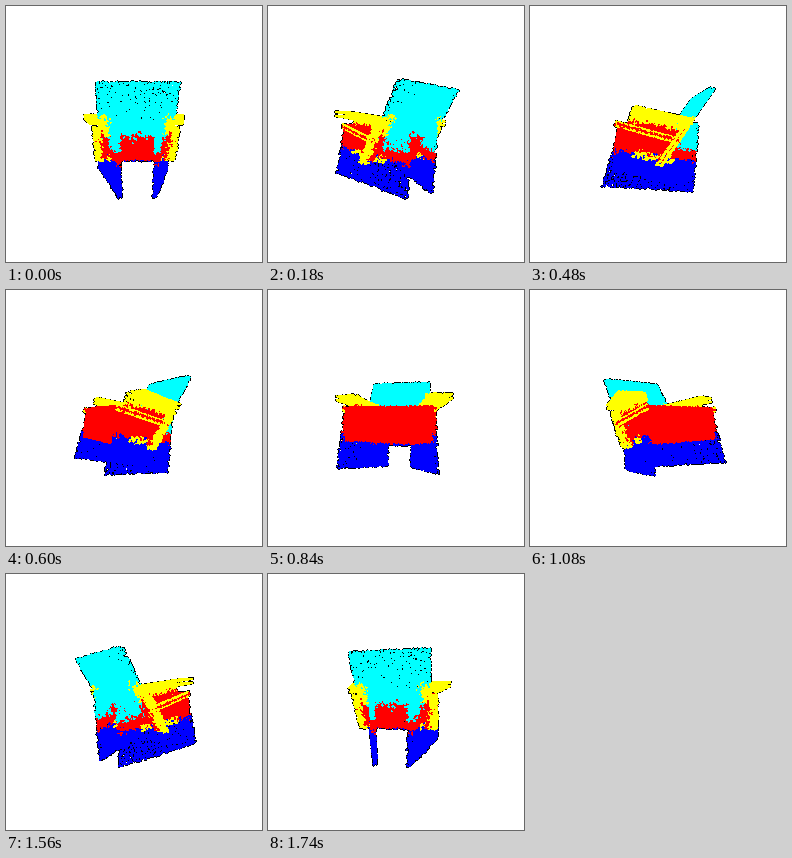
A matplotlib script for the animation above (1800 ms loop, 256x256 px).

```python
import numpy as np
import matplotlib.pyplot as plt
from matplotlib.animation import FuncAnimation

SIZE, FRAMES, INTERVAL = 256, 30, 60
FOCAL = SIZE / 2 / np.tan(np.radians(30))
DIST, RADIUS, SOLID = 3.0, 1.6, 0.7
CYAN, YELLOW, RED, BLUE, BLACK, WHITE = range(6)
PALETTE = np.array([[0, 255, 255], [255, 255, 0], [255, 0, 0], [0, 0, 255],
                    [0, 0, 0], [255, 255, 255]], np.uint8)
PITCH = np.radians(9.8)
LEG_H, SEAT_H, ARM_H = 0.4, 0.66, 0.89

rng = np.random.default_rng(5)
parts = []


def scatter(n):
    """Evenly spread, slightly jittered points in the unit square."""
    k = np.arange(n)
    g = 1.32471795724
    spread = np.outer([1 / g, 1 / g ** 2], k) + rng.random((2, 1))
    return (spread + rng.normal(0, 0.25 / np.sqrt(n), (2, n))) % 1


def noise(x, sd):
    return x + rng.normal(0, sd, len(x))


def add(s, a, h, label):
    """Store points: s sideways, a towards the front, h upwards."""
    label = np.broadcast_to(label, s.shape)
    parts.append(np.column_stack([s, a, h, label]))


def sheet(n, corner, along, across):
    """Points on a parallelogram, and their position across it."""
    i, j = scatter(n)
    pts = np.array(corner)[:, None] + np.outer(along, i) + np.outer(across, j)
    return pts, j


def backrest():
    for offset in (-0.025, 0.025):
        i, t = scatter(1900)
        h = 0.3 + 1.02 * t
        s = (2 * i - 1) * np.where(h < 0.8, 0.54, 0.455)
        label = np.where(noise(h, 0.04) > 0.68, CYAN, RED)
        label[h < 0.315] = BLUE
        rim = np.where(h < 0.68, 0.44, 0.35)
        side = noise(np.abs(s), 0.025) > rim
        label[side & (noise(h, 0.02) < 0.93)] = YELLOW
        add(s, 0.54 - 0.5 * t + offset, h, label)


def leg(side):
    i, j = scatter(2700)
    a, h = 1.12 * i, 0.88 * j
    behind = a < 0.53 - 0.485 * (h - 0.3)
    keep = ((h < SEAT_H) | behind) & (a > 0.09 * h) & (a < 1.12 - 0.12 * h)
    a, h = a[keep], h[keep]
    label = np.where(noise(h, 0.015) < LEG_H, BLUE, RED)
    label[(noise(h, 0.03) > 0.53) & (a < 0.4)] = CYAN
    band = (np.abs(h - LEG_H + 0.02) < 0.045) & (np.abs(a - 0.6) < 0.27)
    label[band & (rng.random(len(a)) < 0.65)] = YELLOW
    thick = rng.uniform(-0.025, 0.025, len(a))
    add(side * (0.195 + 0.313 * a + thick), a, h, label)


def arm(side):
    for top in (ARM_H, ARM_H - 0.05):
        (s, a, h), _ = sheet(420, (0.3, 0.28, top), (0.18, 0.67, 0),
                             (0.255, -0.05, 0))
        add(side * s, a, h, YELLOW)

    (s, a, h), _ = sheet(480, (0.42, 0.3, SEAT_H), (0.01, 0.68, 0),
                         (0, -0.03, ARM_H - SEAT_H))
    add(side * s, a, h, np.where(noise(h, 0.02) > 0.76, YELLOW, RED))

    (s, a, h), j = sheet(420, (0.51, 0.36, 0.59), (0.02, 0.74, 0.07),
                         (0, 0, 0.055))
    add(side * s, a, h, np.where(np.abs(j - 0.5) > 0.25, YELLOW, RED))


def seat():
    for corner, along in (((-0.52, 0.38, 0.63), (0, 0.68, 0.07)),
                          ((-0.52, 1.05, 0.31), (0, 0.01, 0.4))):
        pts, _ = sheet(1800, corner, along, (1.04, 0, 0))
        add(*pts, RED)


backrest()
seat()
for side in (-1, 1):
    leg(side)
    arm(side)

s, a, h, label = np.concatenate(parts).T
label = label.astype(int)

# The chair is pitched slightly backwards and turned a little.
X = 0.042 - 0.05 * a + s
Y = -0.75 + np.sin(PITCH) * a + np.cos(PITCH) * h
Z = 0.44 - np.cos(PITCH) * a + np.sin(PITCH) * h


def render(i):
    """Splat the cloud; faint rims of the dots come out black."""
    th = 2 * np.pi * i / FRAMES
    depth = DIST + X * np.sin(th) - Z * np.cos(th)
    order = np.argsort(-depth)
    px = SIZE / 2 - 0.5 + FOCAL * (X * np.cos(th) + Z * np.sin(th)) / depth
    py = SIZE / 2 - 0.5 - FOCAL * Y / depth
    px, py = px[order, None], py[order, None]

    dy, dx = np.mgrid[-2:3, -2:3].reshape(2, -1)
    gx, gy = np.rint(px) + dx, np.rint(py) + dy
    alpha = 1 - ((gx - px) ** 2 + (gy - py) ** 2) / RADIUS ** 2
    cell = (gy * SIZE + gx).astype(int)
    color = np.repeat(label[order][:, None], dx.size, axis=1)

    img = np.full(SIZE * SIZE, WHITE)
    for low in (0, 0.35):
        hit = alpha > low
        img[cell[hit]] = color[hit]
    hit = alpha > 0
    clear = np.log(np.maximum(1 - alpha[hit], 1e-6))
    clear = np.bincount(cell[hit], clear, SIZE * SIZE)
    img[(img != WHITE) & (clear > np.log(1 - SOLID))] = BLACK
    return PALETTE[img].reshape(SIZE, SIZE, 3)


fig = plt.figure(figsize=(2.56, 2.56), dpi=100, facecolor="white")
ax = fig.add_axes([0, 0, 1, 1])
ax.axis("off")
view = ax.imshow(render(0), interpolation="nearest", aspect="auto")


def update(i):
    view.set_data(render(i))
    return (view,)


anim = FuncAnimation(fig, update, frames=FRAMES, interval=INTERVAL,
                     repeat=True, repeat_delay=0)
plt.show()
```
